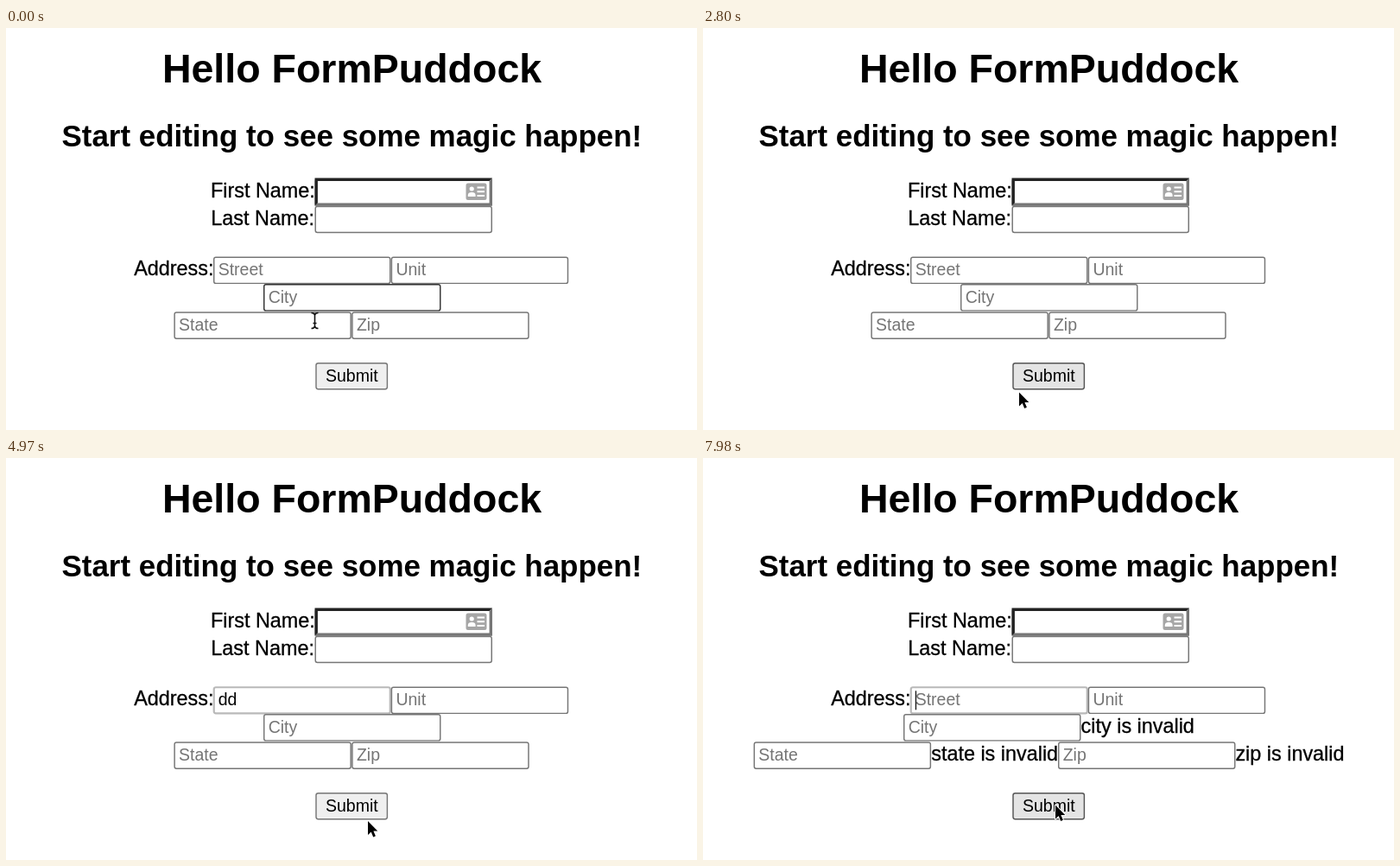
An HTML page that plays this animation: 800x465 px, repeating every 8 s.

```html
<!DOCTYPE html>
<html lang="en">
<head>
<meta charset="utf-8">
<title>Address form</title>
<style>
  html, body { margin: 0; width: 100%; height: 100%; overflow: hidden; background: #fff; }
  svg { display: block; width: 100vw; height: 100vh; }
  text { font-family: "Liberation Sans", Arial, sans-serif; white-space: pre; }
  .label { font-size: 23.4px; stroke: #000; stroke-width: 0.3; }
  .small { font-size: 19.5px; }
  .head { font-weight: 700; text-anchor: middle; }
  .main { font: 500 15px Inter, sans-serif; fill: #181818; stroke: #181818; stroke-width: 0.2; }
  .sub { font: 400 13.5px Inter, sans-serif; fill: #202020; }
</style>
</head>
<body>
<svg id="stage" viewBox="0 0 800 465" xmlns="http://www.w3.org/2000/svg"></svg>
<script>
const LOOP = 8000, STEP = 70;
const W = 205.5, H = 31.6, LINE = 1.46;
const stage = document.getElementById('stage');

function add(tag, attrs, parent = stage, content) {
  const el = document.createElementNS(stage.namespaceURI, tag);
  set(el, attrs);
  if (content) el.textContent = content;
  parent.append(el);
  return el;
}
function set(el, attrs) {
  for (const k in attrs) el.setAttribute(k, attrs[k]);
}
function show(el, on) {
  el.setAttribute('visibility', on ? 'visible' : 'hidden');
}
const text = (x, y, cls, str, parent) => add('text', { x, y, class: cls }, parent, str);

function field(x, y, hint = '') {
  const g = add('g', {});
  const box = add('rect', { x: LINE / 2, y: LINE / 2, width: W - LINE, height: H - LINE, rx: 2.2, fill: '#fff' }, g);
  const label = text(5.7, 21.8, 'small', hint, g);
  const f = { g, box, label, x, y, hint };
  place(f, x);
  fill(f, '');
  focus(f, false);
  return f;
}
function place(f, x) {
  f.x = x;
  f.g.setAttribute('transform', `translate(${x} ${f.y})`);
}
function fill(f, value) {
  f.label.textContent = value || f.hint;
  f.label.setAttribute('fill', value ? '#000' : '#757575');
}
function focus(f, on, color = '#767676') {
  set(f.box, { stroke: on ? '#b9b9b9' : color, 'stroke-width': on ? 2.2 : LINE });
}

// Headings and labels
add('text', { x: 400.5, y: 63, class: 'head', 'font-size': 46.5 }, stage, 'Hello FormPuddock');
add('text', { x: 400.3, y: 137, class: 'head', 'font-size': 34.95 }, stage, 'Start editing to see some magic happen!');
text(237, 195.7, 'label', 'First Name:');
text(237.3, 228, 'label', 'Last Name:');
text(148.2, 286, 'label', 'Address:');

// Inputs
const first = field(357.5, 174);
const last = field(357.5, 205.7);
const street = field(240, 264.5, 'Street');
const unit = field(445.7, 264.5, 'Unit');
const city = field(298, 296, 'City');
const state = field(194.4, 328.3, 'State');
const zip = field(400.2, 328.3, 'Zip');
const fields = [first, last, street, unit, city, state, zip];

// Inset border of the first field
add('path', { d: 'M357.5 173.5H563L559.6 176.9H360.9V202.4L357.5 205.8Z', fill: '#222' });
add('path', { d: 'M563 173.5V205.8H357.5L360.9 202.4H559.6V176.9Z', fill: '#767676' });

// Contact card icon
add('rect', { x: 532.5, y: 179.5, width: 24, height: 19.5, rx: 2.5, fill: '#a6a6a6' });
add('circle', { cx: 539.2, cy: 186, r: 2.6, fill: '#fff' });
add('path', { d: 'M534.8 195V193Q535 190 539.2 190T543.6 193V195Z', fill: '#fff' });
add('path', { d: 'M545.5 184.5H554M545.5 189.3H554M545.5 194H554', stroke: '#fff', 'stroke-width': 2 });

const errors = add('g', {});
text(437.6, 318.4, 'label', 'city is invalid', errors);
text(264.2, 350.2, 'label', 'state is invalid', errors);
text(616.4, 350.2, 'label', 'zip is invalid', errors);

const button = add('rect', { x: 359, y: 387.7, width: 82.4, height: 30, rx: 2.4, 'stroke-width': LINE });
text(370, 409.2, 'small', 'Submit');
const caret = add('rect', { width: 1.3, height: 22, fill: '#111' });

// Autofill list
const list = add('g', {});
add('rect', { x: 237.5, y: 299, width: 241.5, height: 180, fill: '#000', opacity: 0.05 }, list);
add('rect', { x: 239, y: 298, width: 238.8, height: 180, fill: '#c9c9c9' }, list);
add('rect', { x: 240, y: 298, width: 236.8, height: 180, fill: '#fff' }, list);
[['480 Wendmoore Street, #826', 'Dorvan Mellet'],
 ['1936 Pellwyn St', 'NEW CALVORDEN 00417'],
 ['268b felmore st', '']].forEach(([main, sub], i) => {
  const y = 333.3 + i * 67.4;
  text(251.3, y, 'main', main, list);
  text(251.3, y + 24.4, 'sub', sub, list);
});

// Pointer
const ring = add('circle', { fill: '#000', 'fill-opacity': 0.03, stroke: '#000', 'stroke-opacity': 0.2, 'stroke-width': 3.4 });
const arrow = add('path', {
  d: 'M0 0V16L3.7 12.6L6.2 18.4L8.9 17.2L6.4 11.6H11.3Z',
  stroke: '#fff', 'stroke-width': 2, 'stroke-linejoin': 'round', 'paint-order': 'stroke'
});
const beam = add('path', {
  d: 'M-4 -9Q-.5 -9 0 -6.5Q.5 -9 4 -9M0 -7V7M-4 9Q-.5 9 0 6.5Q.5 9 4 9M-2 3H2',
  fill: 'none', stroke: '#111', 'stroke-width': 1.6
});

// time, x, y of the pointer
const path = [
  [0, 357.5, 338.5], [210, 406, 400], [490, 406, 400], [1260, 407, 405],
  [1680, 407, 405], [2310, 366, 421.5], [2800, 366, 421.5], [3500, 300, 281],
  [4410, 300, 281], [4970, 419, 420], [5250, 414, 389.5], [6300, 414, 389.5],
  [6720, 300, 282], [7140, 300, 282], [7770, 408, 401.5], [8000, 408, 401.5]
];
const clicks = [1260, 3640, 5250, 6720];
const CLICK = 420;

const within = (t, a, b) => t >= a && t < b;

function pointerAt(t) {
  const i = Math.max(1, path.findIndex(k => k[0] > t));
  const [t0, x0, y0] = path[i - 1], [t1, x1, y1] = path[i];
  const u = (t - t0) / (t1 - t0), e = u * u * (3 - 2 * u);
  return [x0 + (x1 - x0) * e, y0 + (y1 - y0) * e];
}

function draw(t) {
  const invalid = t >= 5390;
  const onStreet = within(t, 3710, 5320) || t >= 6790;
  const onCity = within(t, 5390, 6790);

  place(city, invalid ? 232 : 298);
  place(state, invalid ? 58.6 : 194.4);
  place(zip, invalid ? 411 : 400.2);
  show(errors, invalid);

  const typed = within(t, 4270, 4340) || within(t, 7000, 7070) ? 'd'
    : within(t, 4340, 7000) ? 'dd' : '';
  fill(street, typed);
  focus(street, onStreet);
  focus(city, onCity, t < 140 ? '#333' : undefined);
  show(list, within(t, 3780, 4270));

  const blinkOn = within(t, 3710, 4760) || within(t, 5460, 5950) ||
    within(t, 6790, 7280) || t >= 7560;
  const owner = onCity ? city : street;
  show(caret, blinkOn);
  set(caret, { x: owner.x + 5.8 + (onCity ? 0 : typed.length * 10.85), y: owner.y + 4.8 });

  const [x, y] = pointerAt(t);
  const visible = !within(t, 3920, 4410) && !within(t, 6930, 7140);
  const overField = fields.some(f => within(x, f.x, f.x + W) && within(y, f.y, f.y + H));
  const at = `translate(${x} ${y})`;
  set(arrow, { transform: at });
  set(beam, { transform: at });
  show(arrow, visible && !overField);
  show(beam, visible && overField);

  const start = clicks.find(c => within(t, c, c + CLICK));
  show(ring, start !== undefined && visible);
  if (start !== undefined) {
    const u = (t - start) / CLICK;
    set(ring, { cx: x - 0.5, cy: y + 2, r: 18 + 4.5 * Math.min(1, u * 2.5), opacity: Math.min(1, (1 - u) * 2.5) });
  }

  const hover = within(t, 1260, 2870) || (within(x, 358, 442) && within(y, 387, 418));
  const pressed = within(t, 1330, 1610) || within(t, 5250, 5390);
  set(button, {
    fill: pressed ? '#f5f5f5' : hover ? '#e4e4e4' : '#efefef',
    stroke: pressed ? '#8c8c8c' : hover ? '#555' : '#767676'
  });
}

function tick(now) {
  draw(Math.floor(now % LOOP / STEP) * STEP);
  requestAnimationFrame(tick);
}
draw(0);
requestAnimationFrame(tick);
</script>
</body>
</html>
```
